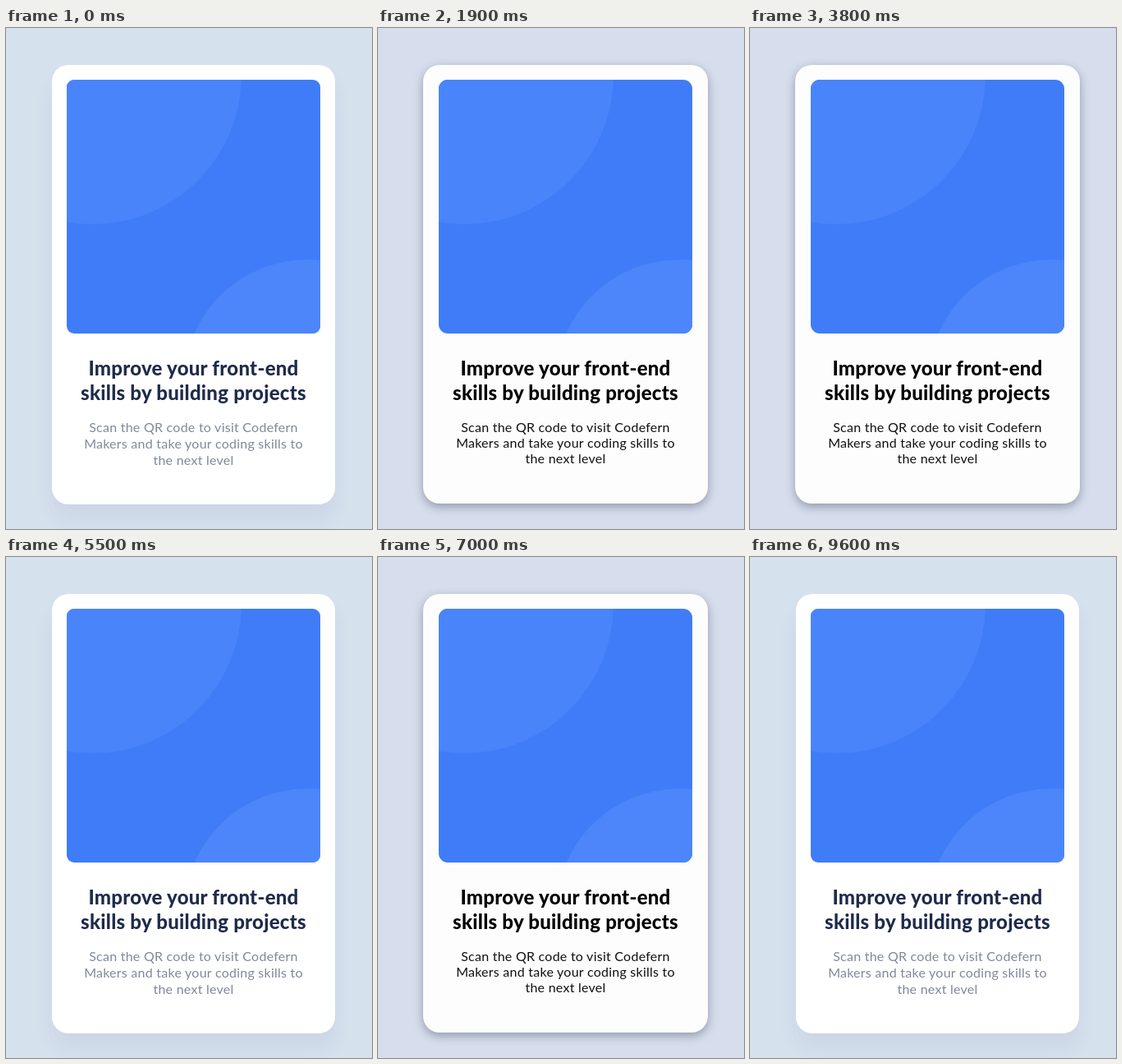
Recreate the animation shown at these times as an HTML page. Size 446 by 610 pixels, loop 9700 ms.

```html
<!DOCTYPE html>
<html lang="en">
<head>
<meta charset="utf-8">
<title>Card design comparison</title>
<style>
  html, body { margin: 0; width: 100%; height: 100%; overflow: hidden; }
  .view { position: absolute; left: 0; top: 0; width: 446px; height: 610px; overflow: hidden; background: var(--bg); }
  .card { position: absolute; left: var(--x); top: 45px; width: var(--w); height: var(--h); border-radius: 20px; background: var(--paper); box-shadow: var(--shadow); }
  svg { position: absolute; left: 0; top: 0; }
  text { font-family: Lato, "Open Sans", sans-serif; text-anchor: middle; }
  .title { font-size: 24px; font-weight: 800; letter-spacing: .25px; fill: var(--title); }
  .copy { font-size: 16px; letter-spacing: .25px; fill: var(--copy); }
  #design { --bg: #d6e1ee; --x: 56px; --w: 345px; --h: 535px; --paper: #fff; --shadow: 0 18px 22px rgba(70, 75, 130, .07); --title: #1f2b4b; --copy: #81889a; }
  #build { --bg: #d6deed; --x: 55px; --w: 347px; --h: 534px; --paper: #fdfdfe; --shadow: 0 4px 12px rgba(40, 50, 75, .4); --title: #000; --copy: #111; }
</style>
</head>
<body>
<div class="view" id="design"></div>
<div class="view" id="build"></div>
<script>
const LOOP = 9700;
const SWITCHES = [1600, 2800, 3500, 4500, 5700, 6300, 6800, 7600];
const TITLE = ["Improve your front-end", "skills by building projects"];
const COPY = ["Scan the QR code to visit Codefern", "Makers and take your coding skills to", "the next level"];

const lines = (list, cls, y, step) => list.map((s, i) =>
  `<text class="${cls}" x="228.5" y="${y + i * step}">${s}</text>`).join("");

function drawView(id, radius, copyY, copyStep) {
  document.getElementById(id).innerHTML = `
    <div class="card"></div>
    <svg width="446" height="610">
      <clipPath id="${id}-clip"><rect x="74" y="63" width="309" height="309" rx="${radius}"/></clipPath>
      <g clip-path="url(#${id}-clip)">
        <rect x="74" y="63" width="309" height="309" fill="#407cf7"/>
        <circle cx="105" cy="57" r="182" fill="#4a84fa"/>
        <circle cx="367" cy="432" r="150" fill="#4c86fa"/>
      </g>
      ${lines(TITLE, "title", 422.5, 30)}
      ${lines(COPY, "copy", copyY, copyStep)}
    </svg>`;
}

drawView("design", 9, 491.5, 20.4);
drawView("build", 11, 492, 19);

// Hard cuts between the two views
const steps = [0, ...SWITCHES, LOOP].map((t, i) => ({
  offset: t / LOOP, opacity: t < LOOP ? i % 2 : 0, easing: "steps(1, end)"
}));
document.getElementById("build").animate(steps, { duration: LOOP, iterations: Infinity });
</script>
</body>
</html>
```
